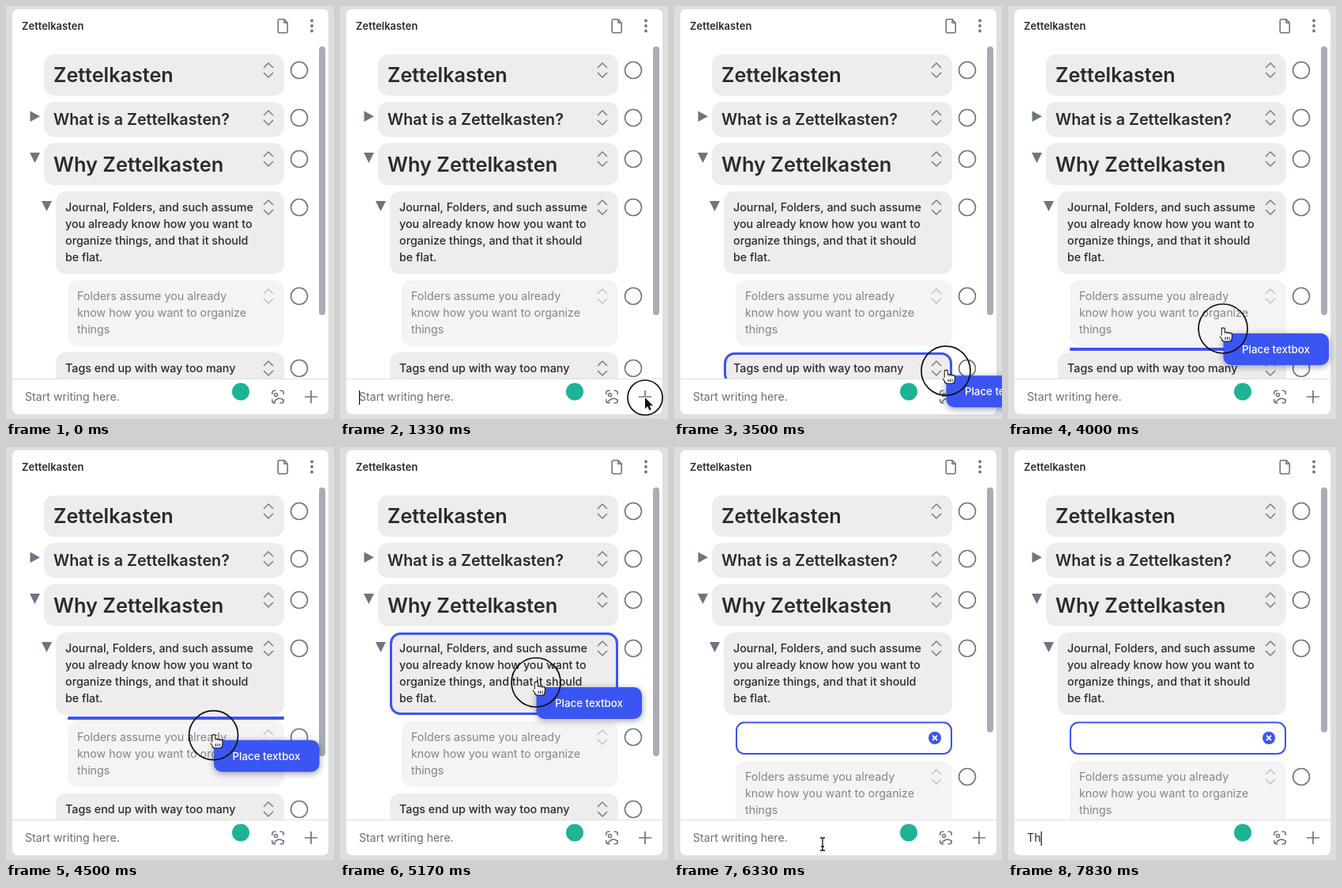
These frames come from a looping animation (415 px wide and 521 px high, 8000 ms). An HTML page with a canvas:

```html
<!DOCTYPE html>
<html lang="en">
<head>
<meta charset="utf-8">
<title>Zettelkasten</title>
<style>
html, body { margin: 0; width: 100%; height: 100%; overflow: hidden; background: #dcdfdd; }
canvas { display: block; width: 415px; height: 521px; }
</style>
</head>
<body>
<canvas id="stage"></canvas>
<script>
const W = 415, H = 521, LOOP = 8000, TICKS = 48;
const INK = '#2b2a2d', SLATE = '#6f7482', BLUE = '#3b55f3', BLACK = '#111';
const RIGHT = 352, GAP = 8, LINE = 21, BAR = 470;
const ENTER = 4, CLICK = 8, PRESS = 17, DRAG = 20, DROP = 34, TYPE = 46;

const canvas = document.getElementById('stage');
const c = canvas.getContext('2d');
const dpr = window.devicePixelRatio || 1;
canvas.width = W * dpr;
canvas.height = H * dpr;

const notes = [
  { x: 48, rows: ['Zettelkasten'], size: 25.2 },
  { x: 48, rows: ['What is a Zettelkasten?'], size: 19.8, toggle: 'closed' },
  { x: 48, rows: ['Why Zettelkasten'], size: 25.4, toggle: 'open' },
  { x: 63, toggle: 'open', rows: ['Journal, Folders, and such assume',
    'you already know how you want to', 'organize things, and that it should', 'be flat.'] },
  { x: 78, faded: true, rows: ['Folders assume you already',
    'know how you want to organize', 'things'] },
  { x: 63, rows: ['Tags end up with way too many'] }
];
const field = { x: 78, empty: true, rows: [''] };

// Pointer moves: start tick, end tick, destination; it rests in between
const moves = [
  [ENTER, 7, 386, 494],
  [16, PRESS, 383, 489],
  [19, 24, 272, 407],
  [24, 31, 248, 297],
  [31, 33, 267, 343],
  [DROP, 38, 188, 501]
];

function pointer(k) {
  let x = 350, y = 530;
  for (const [from, to, tx, ty] of moves) {
    const u = Math.min(1, Math.max(0, (k - from) / (to - from)));
    const e = u * u * (3 - 2 * u);
    x += (tx - x) * e;
    y += (ty - y) * e;
  }
  return { x, y };
}

// Stacks the notes from the top, each as high as its text
function layout(dropped) {
  const list = dropped ? notes.toSpliced(4, 0, field) : notes;
  let y = 61;
  return list.map(n => {
    const h = n.size ? Math.round(12 + 1.6 * n.size) : 20 + LINE * n.rows.length + (n.empty ? 1 : 0);
    const placed = { ...n, y, h };
    y += h + GAP;
    return placed;
  });
}

function box(x, y, w, h, r, fill, stroke, lw) {
  c.beginPath();
  c.roundRect(x, y, w, h, r);
  if (fill) { c.fillStyle = fill; c.fill(); }
  if (stroke) { c.strokeStyle = stroke; c.lineWidth = lw; c.stroke(); }
}

function text(s, x, y, size, color = INK, weight = 400) {
  c.font = `${weight} ${size}px Inter, "Open Sans", sans-serif`;
  c.fillStyle = color;
  c.fillText(s, x, y);
}

function line(d, color, lw) {
  c.strokeStyle = color;
  c.lineWidth = lw;
  c.stroke(new Path2D(d));
}

function fill(d, color) {
  c.fillStyle = color;
  c.fill(new Path2D(d));
}

function disc(x, y, r, color) {
  c.beginPath();
  c.arc(x, y, r, 0, 7);
  c.fillStyle = color;
  c.fill();
}

function ring(x, y, r, color, lw) {
  c.beginPath();
  c.arc(x, y, r, 0, 7);
  c.strokeStyle = color;
  c.lineWidth = lw;
  c.stroke();
}

function note({ x, y, h, rows, size, toggle, faded, empty }) {
  const mid = y + 20;
  if (empty) {
    box(x + 1, y + 1.5, RIGHT - x - 2, h - 2.5, 10, '#fff', BLUE, 2);
    disc(330, mid + 1, 8, BLUE);
    line(`M327 ${mid - 2}l6 6m0 -6l-6 6`, '#fff', 1.8);
    return;
  }
  box(x, y, RIGHT - x, h, 13, faded ? '#f5f3f5' : '#eeecec');
  if (size) text(rows[0], x + 12, y + h / 2 + 0.36 * size, size, INK, 600);
  else rows.forEach((s, i) =>
    text(s, x + 12, y + 25 + LINE * i, 14.3, faded ? '#868488' : INK, faded ? 400 : 450));
  line(`M326 ${mid - 3}l6 -6 6 6m-12 6l6 6 6 -6`, faded ? '#c2c3c9' : '#7c7f87', 1.5);
  ring(371, mid, 10.5, SLATE, 1.6);
  if (toggle === 'closed') fill(`M${x - 17.5} ${y + 11.5}l12.5 6.7 -12.5 6.7z`, SLATE);
  if (toggle === 'open') fill(`M${x - 18} ${y + 12}h13l-6.5 13z`, SLATE);
}

function header() {
  text('Zettelkasten', 20, 30, 13, INK, 600);
  line('M352 16.8h-5.8q-2 0 -2 2v13q0 2 2 2h8q2 0 2 -2v-10.6zv4.4h4.3', SLATE, 1.6);
  for (let y = 18.5; y < 33; y += 6.5) disc(387, y, 1.9, SLATE);
}

// Edges of a note insert beside it, its middle selects it
function dropMark(list, y) {
  const n = list.find(n => y < n.y + n.h + GAP / 2);
  const part = (y - n.y) / n.h;
  const w = RIGHT - n.x;
  if (part < 0.3) box(n.x, n.y - 6, w, 4, 1.5, BLUE);
  else if (part > 0.7) box(n.x, n.y + n.h + 2, w, 4, 1.5, BLUE);
  else box(n.x + 1.5, n.y + 1.5, w - 3, n.h - 3, 12, null, BLUE, 3);
}

function page(dropped, dragY) {
  const list = layout(dropped);
  c.save();
  c.beginPath();
  c.rect(8, 40, 400, BAR - 40);
  c.clip();
  list.forEach(note);
  if (dragY < BAR) dropMark(list, dragY);
  box(396, 51, 8, dropped ? 309 : 339, 4, '#a9acb7');
  c.restore();
}

function caretOn(k) {
  if (k >= TYPE) return true;
  const focus = k < PRESS ? 7 : DROP + 1;
  return k >= focus && (k - focus) % 6 < 3;
}

function inputBar(k) {
  c.fillStyle = '#dedfe0';
  c.fillRect(8, BAR, 400, 1);
  const typed = 'Th'.slice(0, Math.max(0, k - TYPE + 1));
  text(typed || 'Start writing here.', 24, 498, 14.2, typed ? INK : '#6d6c70');
  if (caretOn(k)) {
    c.fillStyle = BLACK;
    c.fillRect(24 + (typed ? c.measureText(typed).width : 0), 485, 1.2, 18);
  }
  disc(297, 486.5, 11, '#1db394');
  line('M336.8 490v-2q0 -2.7 2.7 -2.7h2m5 0h2q2.7 0 2.7 2.7v2m0 6v2q0 2.7 -2.7 2.7h-2' +
    'm-5 0h-2q-2.7 0 -2.7 -2.7v-2m2 3.5q6 -7.5 12 -2.5', SLATE, 1.6);
  ring(341.5, 490.5, 2, SLATE, 1.5);
  line('M378 493h16m-8 -8v16', SLATE, 1.7);
}

function chip({ x, y }) {
  c.save();
  c.shadowColor = 'rgba(30,35,60,.45)';
  c.shadowBlur = 9 * dpr;
  c.shadowOffsetY = 2 * dpr;
  box(x + 0.5, y + 6, 133.5, 40, 10, BLUE);
  c.restore();
  c.textAlign = 'center';
  text('Place textbox', x + 67, y + 31, 13.3, '#fff', 500);
  c.textAlign = 'left';
}

function hand() {
  const fingers = (grow, color) => {
    for (let i = 0; i < 4; i++) {
      const top = i ? 4.5 + i * 0.5 : -0.5;
      box(-1.2 + 3 * i - grow, top - grow, 3 + 2 * grow, 12 - top + 2 * grow, 1.6, color);
    }
    box(-1 - grow, 8 - grow, 11.5 + 2 * grow, 7.5 + 2 * grow, 3, color);
    line('M-2.5 9l3 4', color, 2.4 + 2 * grow);
  };
  fingers(1, BLACK);
  fingers(0, '#fff');
  line('M3 10.5v3.5m2.5 -3.5v3.5m2.5 -3.5v3.5', BLACK, 1);
}

function cursor(k, { x, y }) {
  const held = k >= PRESS && k < DROP;
  if (held) ring(x, y, 31, BLACK, 1.7);
  if (k >= CLICK && k < CLICK + 2) ring(x, y, 22, BLACK, 1.7);
  c.save();
  c.translate(x, y);
  if (held) {
    hand();
  } else if (k > DROP && y > BAR) {
    const beam = 'M-3 -8h2l1 1 1 -1h2m-3 1v14m-3 1h2l1 -1 1 1h2m-5 -5h4';
    line(beam, '#fff', 3);
    line(beam, BLACK, 1.3);
  } else {
    const arrow = 'M0 0v14l3.2 -3 2.2 5 2.4 -1 -2.1 -4.8h4.3z';
    line(arrow, '#fff', 2);
    fill(arrow, BLACK);
  }
  c.restore();
}

function draw(time) {
  const k = Math.floor((time % LOOP + 4) * TICKS / LOOP) % TICKS;
  const pos = pointer(k);
  const dragging = k >= DRAG && k < DROP;
  c.setTransform(dpr, 0, 0, dpr, 0, 0);
  c.lineJoin = 'round';
  c.fillStyle = '#dcdfdd';
  c.fillRect(0, 0, W, H);
  box(8, 4, 400, 511, 7, '#fff');
  header();
  page(k >= DROP, dragging ? pos.y : H);
  inputBar(k);
  if (dragging) chip(pos);
  if (k > ENTER && k < TYPE) cursor(k, pos);
}

let start;
function tick(now) {
  start ??= now;
  draw(now - start);
  requestAnimationFrame(tick);
}
draw(0);
requestAnimationFrame(tick);
</script>
</body>
</html>
```
